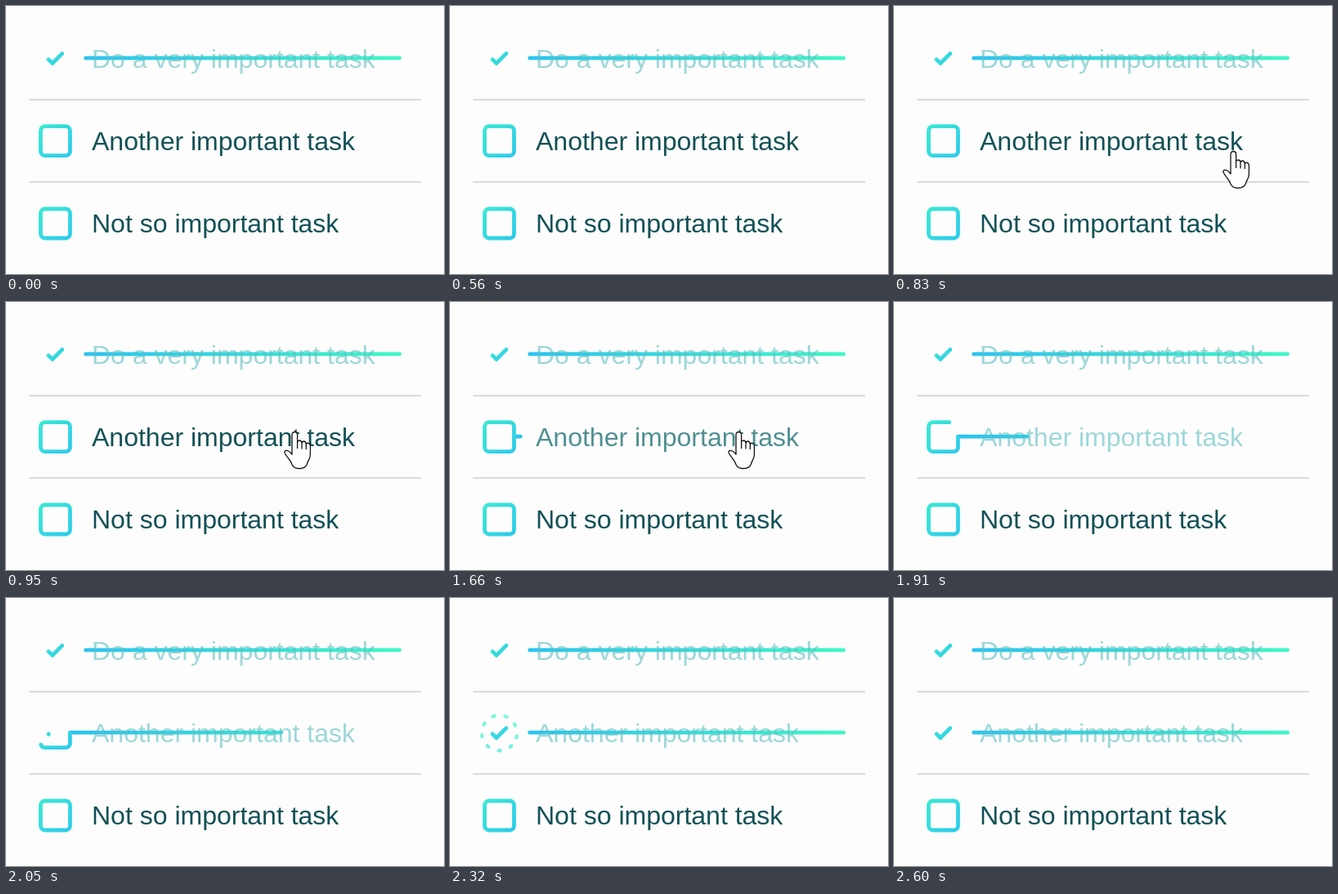
These frames come from a looping animation (536x329 px, 3280 ms). An HTML page:

```html
<!DOCTYPE html>
<html lang="en">
<head>
<meta charset="utf-8">
<title>Todo list</title>
<style>
  html, body { margin: 0; width: 100%; height: 100%; overflow: hidden; background: #fdfdfd; }
  svg { display: block; }
  text { font: 32px "Liberation Sans", Arial, sans-serif; }
  .icon { fill: none; stroke: url(#boxGradient); stroke-width: 2; stroke-linecap: round; stroke-linejoin: round; }
  .line { stroke: url(#lineGradient); }
</style>
</head>
<body>
<svg id="stage" width="536" height="329" viewBox="0 0 536 329">
  <defs>
    <linearGradient id="boxGradient" gradientUnits="userSpaceOnUse" x1="0" y1="0" x2="25" y2="25">
      <stop offset="0" stop-color="#3ff3cb"/><stop offset="1" stop-color="#2bc1f1"/>
    </linearGradient>
    <linearGradient id="lineGradient" gradientUnits="userSpaceOnUse" x1="21" y1="0" x2="189" y2="0">
      <stop offset="0" stop-color="#2bc1f1"/><stop offset="1" stop-color="#43f5c6"/>
    </linearGradient>
  </defs>
  <path d="M28 115H508M28 216H508" stroke="#dadada" stroke-width="2"/>
  <g id="rows"></g>
  <path id="hand" fill="#fff" stroke="#111" stroke-width="1.3" stroke-linejoin="round"
    d="M10 29V5Q10 1.5 13.3 1.5T16.6 5V14Q17 12 19.3 12T22 15Q22.5 13 24.6 13T27.3 16.5Q28 15 30 15.3T32.4 18.5V29C32.4 36 28.5 37 28.5 41Q26 46.5 19 46.5T10 41.5C8.5 36 4 33 1.2 27.5Q0.2 24.6 3 24.4C6 24.3 8 26.5 10 29ZM16.6 14V22M22 15V22.5M27.3 16.5V23"/>
</svg>
<script>
const LOOP = 3280;
const STEPS = [0, 560, 690, 830, 950, 1660, 1780, 1910, 2050, 2170, 2320, 2450, 2600];
const CLICK = 1505;
const DURATION = 800;
const BOX_LENGTH = 56.1;
const CHECK_LENGTH = 9.9;
const LABELS = ["Do a very important task", "Another important task", "Not so important task"];
const HAND = { 690: [503, 214], 830: [402, 177], 950: [340, 158], 1660: [340, 158], 1780: [400, 178] };

const clamp = v => Math.min(1, Math.max(0, v));
const mix = (a, b, k) => a + (b - a) * k;

// cubic-bezier(.9, 0, .5, 1)
function ease(x) {
  if (x <= 0 || x >= 1) return clamp(x);
  let lo = 0, hi = 1;
  for (let i = 0; i < 30; i++) {
    const s = (lo + hi) / 2, r = 1 - s;
    if (2.7 * r * r * s + 1.5 * r * s * s + s ** 3 < x) lo = s; else hi = s;
  }
  return lo * lo * (3 - 2 * lo);
}

function makeRow(label, i) {
  const row = document.createElementNS("http://www.w3.org/2000/svg", "g");
  row.setAttribute("transform", `translate(28 ${34.4 + 101.3 * i})`);
  row.innerHTML = `
    <g class="icon" transform="scale(2.4)">
      <path class="line" d="M21 12.3h168" stroke-dasharray="168 1684"/>
      <path class="box" d="M21 12.7v5c0 1.3-1 2.3-2.3 2.3H8.3C7 20 6 19 6 17.7V7.3C6 6 7 5 8.3 5h10.4C20 5 21 6 21 7.3v5.4" stroke-dasharray="${BOX_LENGTH}"/>
      <path class="check" d="M10 13l2 2 5-5" stroke-dasharray="${CHECK_LENGTH}"/>
      <circle class="burst" r="10" stroke-dasharray="1 6"/>
    </g>
    <text x="77" y="41.4">${label}</text>`;
  document.getElementById("rows").append(row);
  const part = name => row.querySelector(name);
  return { line: part(".line"), box: part(".box"), check: part(".check"), burst: part(".burst"), text: part("text") };
}

function setDash(el, offset, visible) {
  el.setAttribute("stroke-dashoffset", offset);
  el.setAttribute("visibility", visible ? "visible" : "hidden");
}

function drawBurst(el, t) {
  const active = t > 0 && t < 1;
  el.setAttribute("visibility", active ? "visible" : "hidden");
  if (!active) return;
  const grow = clamp(t / 0.3), fade = clamp((t - 0.3) / 0.7);
  const scale = mix(mix(0.4, 0.8, grow), 1.1, fade);
  const angle = mix(40 * grow, 60, fade);
  el.setAttribute("transform", `translate(13.5 12.5) rotate(${angle}) scale(${scale})`);
  el.setAttribute("stroke-width", mix(3 * grow, 0, fade));
  el.setAttribute("stroke-opacity", 1 - fade);
}

// elapsed: milliseconds since the item was ticked
function drawRow(row, elapsed) {
  const p = ease(elapsed / DURATION);
  const c = ease((elapsed - 480) / 320);
  const k = clamp(elapsed / 400);
  setDash(row.line, 168 - 176 * p, p > 0);
  setDash(row.box, BOX_LENGTH * p, p < 1);
  setDash(row.check, CHECK_LENGTH * (1 - c), c > 0);
  drawBurst(row.burst, (elapsed - 560) / 480);
  row.text.setAttribute("fill", `rgb(${mix(19, 94, k)},${mix(81, 190, k)},${mix(86, 193, k)})`);
  row.text.setAttribute("opacity", mix(1, 0.6, k));
}

const rows = LABELS.map(makeRow);
const hand = document.getElementById("hand");

function render(time) {
  const t = STEPS.findLast(s => s <= time);
  drawRow(rows[0], Infinity);
  drawRow(rows[1], t - CLICK);
  drawRow(rows[2], -1);
  const spot = HAND[t];
  hand.setAttribute("visibility", spot ? "visible" : "hidden");
  if (spot) hand.setAttribute("transform", `translate(${spot})`);
}

function tick() {
  render(performance.now() % LOOP);
  requestAnimationFrame(tick);
}
tick();
</script>
</body>
</html>
```
